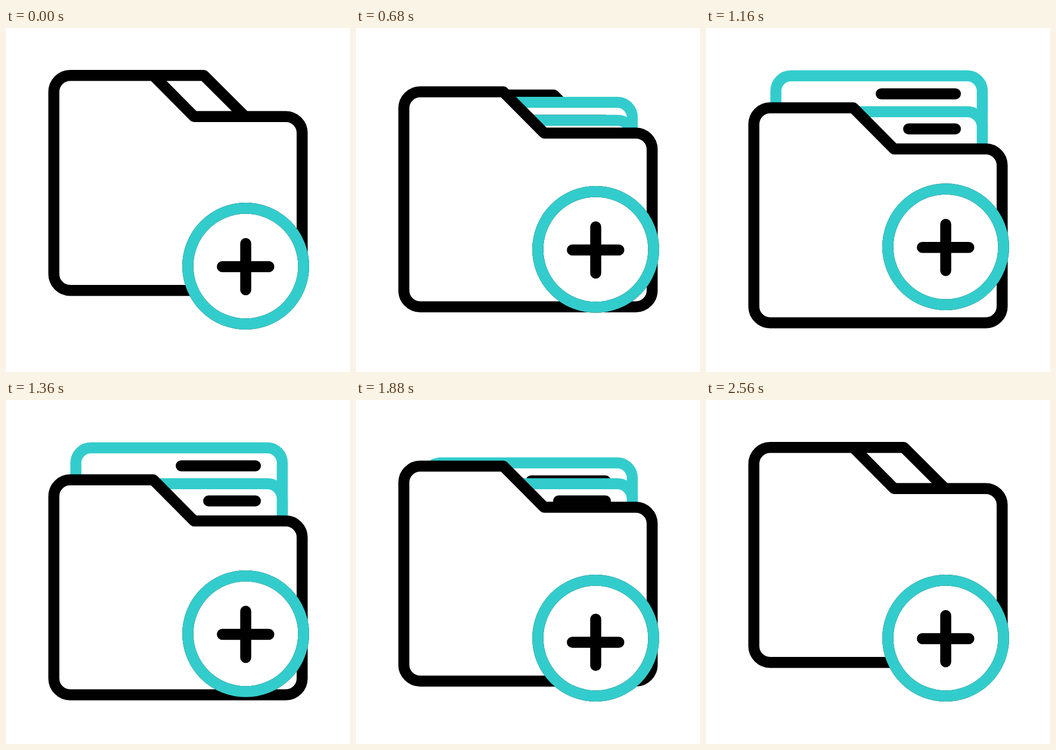
These frames come from a looping animation (640x640 px, 3 s). An HTML page:

```html
<!DOCTYPE html>
<html lang="en">
<head>
<meta charset="utf-8">
<title>Add folder</title>
<style>
  html, body { margin: 0; width: 100%; height: 100%; overflow: hidden; background: #fff; }
  svg { display: block; width: 100%; height: 100%; }
  path, circle { fill: #fff; stroke: #000; stroke-width: 20.5; stroke-linecap: round; stroke-linejoin: round; }
  .teal { stroke: #3cc; }
  .bare { fill: none; }
</style>
</head>
<body>
<svg viewBox="0 0 640 640">
  <defs>
    <clipPath id="hole"><circle cx="446" cy="443" r="98"/></clipPath>
    <path id="sheet" class="teal" d="M130 340V117a28 28 0 0 1 28-28H486a28 28 0 0 1 28 28V340Z"/>
    <path id="cross" d="M446 401v86M402.500 444h86.500"/>
  </defs>
  <path id="back" d="M260 88.200H368L445 165V300H260Z"/>
  <g id="rear">
    <use href="#sheet"/>
    <path d="M326 122.500H464"/>
  </g>
  <g id="near">
    <use href="#sheet" y="66.700"/>
    <path d="M377 187.700H464"/>
  </g>
  <path id="front" d="M274 88.200H119.500a30.500 30.500 0 0 0-30.500 30.500V457.700a30.500 30.500 0 0 0 30.500 30.500H520.500a30.500 30.500 0 0 0 30.500-30.500V195.300a30.500 30.500 0 0 0-30.500-30.500H350Z"/>
  <g id="badge">
    <circle cx="446" cy="443" r="107.700"/>
    <g clip-path="url(#hole)">
      <g id="pluses">
        <use href="#cross"/>
        <use href="#cross" y="-206"/>
      </g>
    </g>
    <circle class="teal bare" cx="446" cy="443" r="107.700"/>
  </g>
</svg>
<script>
const LOOP = 3000, STEP = 40;

// cubic-bezier(.42, 0, .58, 1)
function ease(x) {
  if (x <= 0) return 0;
  if (x >= 1) return 1;
  let lo = 0, hi = 1;
  for (let i = 0; i < 24; i++) {
    const u = (lo + hi) / 2, v = 1 - u;
    if (1.26 * u * v * v + 1.74 * u * u * v + u * u * u < x) lo = u;
    else hi = u;
  }
  return lo * lo * (3 - 2 * lo);
}

const ramp = (t, from, to) => ease((t - from) / (to - from));
// Goes 0 to 1 between a and b, then back to 0 between c and d
const swing = (t, a, b, c, d) => ramp(t, a, b) - ramp(t, c, d);

function shift(id, y) {
  document.getElementById(id).setAttribute('transform', `translate(0 ${y.toFixed(3)})`);
}

function draw(now) {
  const t = Math.floor(now % LOOP / STEP) * STEP;
  const open = swing(t, 385, 970, 1625, 2185);
  shift('front', 60.300 * open);
  shift('back', 72 * open);
  shift('rear', 100 * (1 - swing(t, 380, 975, 1660, 2260)));
  shift('near', 54 * (1 - swing(t, 320, 900, 1960, 2560)));
  shift('badge', -51.200 * swing(t, 345, 940, 940, 1520));
  shift('pluses', 206 * ramp(t, 1780, 2560));
}

const start = performance.now();
function tick() {
  draw(performance.now() - start);
  requestAnimationFrame(tick);
}
tick();
</script>
</body>
</html>
```
